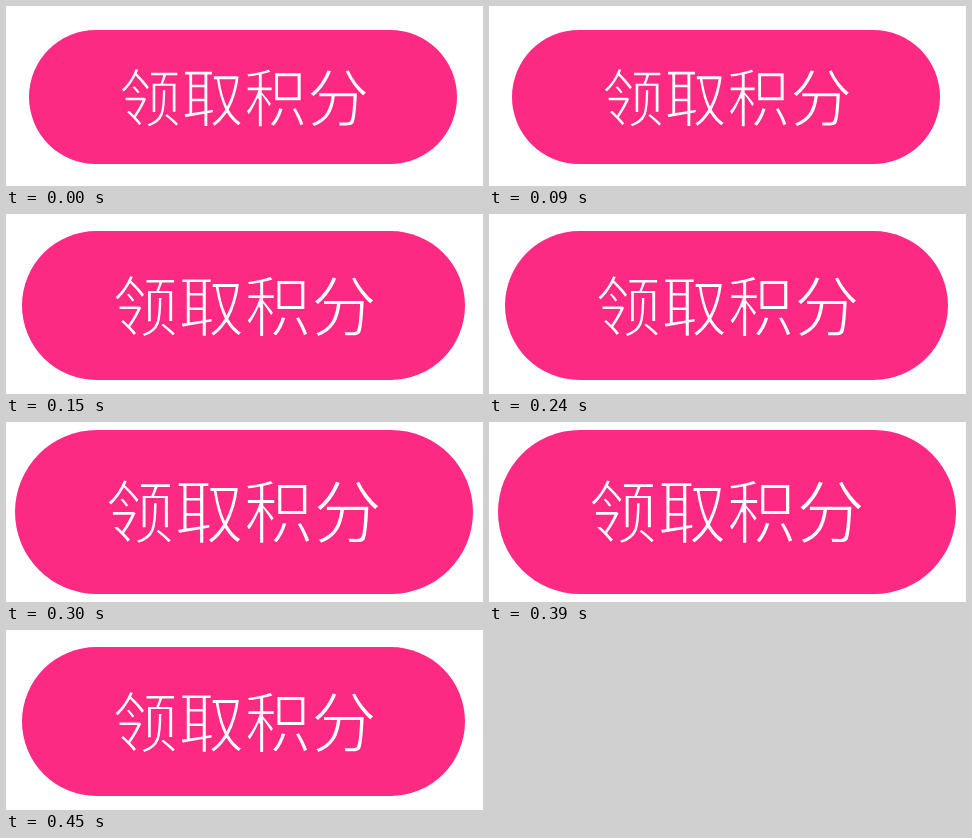
Write an HTML page that moves like this. It is 477x180 px and loops after 600 ms.

```html
<!DOCTYPE html>
<html lang="zh-CN">
<head>
<meta charset="utf-8">
<title>领取积分</title>
<style>
  :root { --pink: #fc2a82; }
  html, body { margin: 0; width: 100%; height: 100%; overflow: hidden; background: #fff; }
  svg { display: block; }
  rect { fill: var(--pink); }
  /* The pink outline trims the glyphs to a light weight. */
  text {
    font-family: "Noto Sans CJK SC", "Noto Sans CJK", sans-serif;
    font-weight: 300;
    text-anchor: middle;
    fill: #fff;
    stroke: var(--pink);
    stroke-width: 0.027em;
  }
</style>
</head>
<body>
<svg width="477" height="180" viewBox="0 0 477 180">
  <rect id="pill"/>
  <text id="label">领取积分</text>
</svg>
<script>
  const STEP = 150;
  const small = { x: 23, y: 24, w: 428, h: 134, size: 62.8, cx: 238, base: 114.5 };
  const medium = { x: 16, y: 17, w: 443, h: 149, size: 66.3, cx: 238.5, base: 117 };
  const large = { x: 9, y: 8, w: 458, h: 164, size: 69.3, cx: 237.7, base: 115.7 };
  const poses = [small, medium, large, medium];

  const pill = document.getElementById("pill");
  const label = document.getElementById("label");

  function set(el, attrs) {
    for (const key in attrs) el.setAttribute(key, attrs[key]);
  }

  // The pulse jumps between sizes, holding each one for STEP ms.
  function draw(ms) {
    const p = poses[Math.floor(ms / STEP) % poses.length];
    set(pill, { x: p.x, y: p.y, width: p.w, height: p.h, rx: p.h / 2 });
    set(label, { x: p.cx, y: p.base, "font-size": p.size });
  }

  const start = performance.now();
  function tick() {
    draw(performance.now() - start);
    requestAnimationFrame(tick);
  }
  tick();
</script>
</body>
</html>
```
